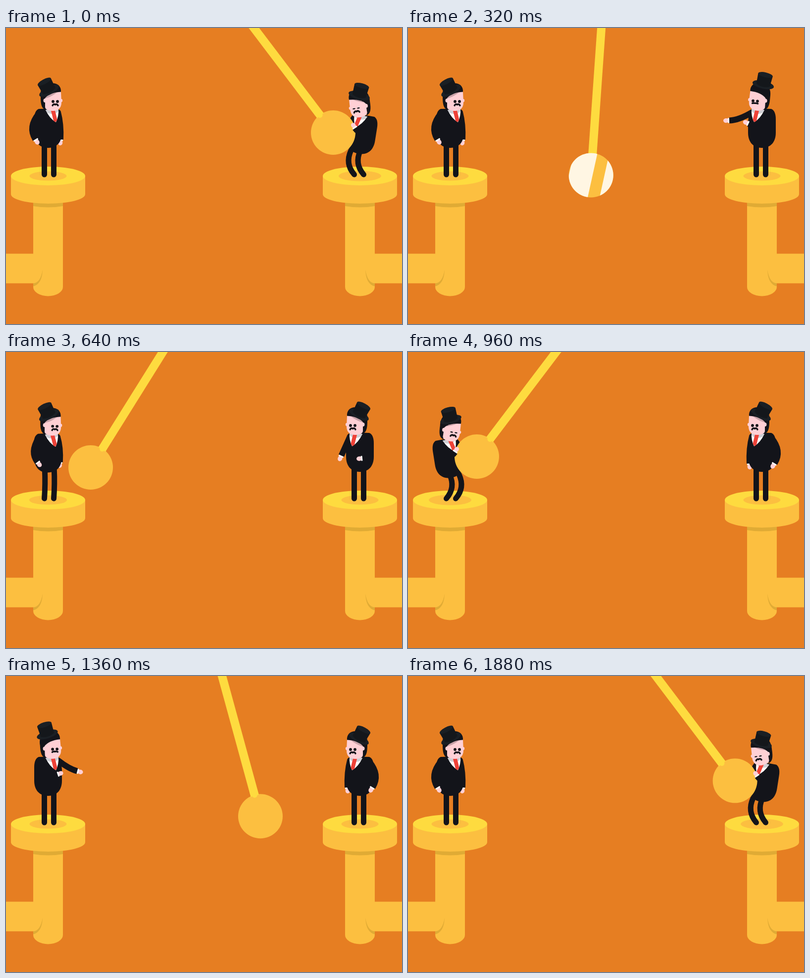
These frames come from a looping animation (800x600 px, 1920 ms). An HTML page with a canvas:

```html
<!DOCTYPE html>
<html lang="en">
<head>
<meta charset="utf-8">
<title>Pendulum push</title>
<style>
  html, body { margin: 0; width: 100%; height: 100%; overflow: hidden; background: #e67e22; }
  canvas { display: block; }
</style>
</head>
<body>
<canvas id="stage" width="800" height="600"></canvas>
<script>
const ctx = document.getElementById('stage').getContext('2d');
const LOOP = 1920, HALF = LOOP / 2, STEP = 40, RAD = Math.PI / 180;
const PIVOT = { x: 400, y: -133.6 }, LENGTH = 433.1, SWING = 37.06, BALL = 45;

const color = {
  back: '#e67e22', gold: '#fcbf40', bright: '#fedb3f', shade: '#e0ab35', glint: '#fff6e3',
  suit: '#13141a', hat: '#14171b', hatTop: '#1a1f24', skin: '#ffd0d5', tie: '#ee4238',
  shirt: '#fff', chin: '#cfcfd4'
};

// crouch, mouth curve | head x, y, turn | hat x, y, turn | near elbow, wrist | far elbow, wrist
const hit   = [1, 1,   -7, 14, 9,   86.5, 137, -15,  82, 222, 94.5, 203,    104, 190, 100, 200];
const push  = [0, 0,   -2, -1, -8,  80.5, 113, -10,  92, 203, 117, 190,     125, 183, 155, 184];
const hold  = [0, .1,  -1, -1, -4,  82.5, 115, -13,  86, 206, 112, 194,     132, 187, 151, 187.5];
const lower = [0, 1,   -.5, 0, 0,   86, 127, -28,    60, 212, 84, 213,      116, 192, 126, 206];
const drop  = [0, 1,   0, 0, 0,     87, 127, -28,    57, 213, 80, 215.5,    114.5, 192, 122.5, 210];
const idle  = [0, 1,   0, 0, 0,     87, 127, -28,    44, 200, 59.5, 225.5,  111.5, 195, 110, 226];

const linear = z => z;
const smooth = z => z * z * (3 - 2 * z);
const easeOut = z => 1 - (1 - z) * (1 - z);

// each key: time, pose, easing towards the next key
const keys = [
  [0, hit, smooth], [190, push, linear], [240, push, linear], [320, hold, linear],
  [600, lower, linear], [640, drop, easeOut], [900, idle, linear], [1580, idle, easeOut],
  [LOOP, hit, linear]
];

function poseAt(time) {
  let i = 0;
  while (time >= keys[i + 1][0]) i++;
  const [start, from, ease] = keys[i], [end, to] = keys[i + 1];
  const z = ease((time - start) / (end - start));
  return from.map((v, n) => v + (to[n] - v) * z);
}

// cubic-bezier(.333, 0, .16, 1)
function swingEase(u) {
  let lo = 0, hi = 1;
  for (let i = 0; i < 24; i++) {
    const s = (lo + hi) / 2, r = 1 - s;
    if (3 * r * r * s * .333 + 3 * r * s * s * .16 + s * s * s < u) lo = s; else hi = s;
  }
  return smooth(lo);
}

function fill(style, path) {
  ctx.fillStyle = style;
  ctx.fill(path);
}

function oval(style, x, y, rx, ry, turn = 0) {
  ctx.fillStyle = style;
  ctx.beginPath();
  ctx.ellipse(x, y, rx, ry, turn, 0, 7);
  ctx.fill();
}

function line(style, width, cap, ...p) {
  ctx.strokeStyle = style;
  ctx.lineWidth = width;
  ctx.lineCap = cap;
  ctx.beginPath();
  ctx.moveTo(p[0], p[1]);
  if (p.length > 4) ctx.quadraticCurveTo(p[2], p[3], p[4], p[5]);
  else ctx.lineTo(p[2], p[3]);
  ctx.stroke();
}

function scoped(draw) {
  ctx.save();
  draw();
  ctx.restore();
}

function mirrored(on, draw) {
  scoped(() => {
    if (on) { ctx.translate(800, 0); ctx.scale(-1, 1); }
    draw();
  });
}

const shape = {
  pipe: new Path2D('M55 345V525A30 18.5 0 0 0 115 525V345Z'),
  pipeShade: new Path2D('M55 340V361Q85 366 115 361V340Z'),
  elbow: new Path2D('M0 457.5H60V517.5H0Z'),
  elbowShade: new Path2D('M74 490C73 511 66 521 55 523.5V517.5C65 517 71 508 74 490Z'),
  disc: new Path2D('M10 300V337A75 19 0 0 0 160 337V300Z'),
  body: new Path2D('M66 164Q57 168 57 185V212C57 232 68 243 85 243C102 243 113 232 113 212V190Q112 172 104 163Z'),
  shirt: new Path2D('M80 166L106 164Q107 178 101 191Q88 184 80 166Z'),
  tie: new Path2D('M91 168L99 167L103.500 186L100 191L96 188Z'),
  hair: new Path2D('M80 166C72 163 70 155 70 140C68 120 78 112 92 112C104 111 112 118 111 130L90 150Z'),
  face: new Path2D('M79 142Q88 131 111 129.500L112 151C112 163 104 168 95 168C88 168 79 166 79 160Z'),
  crown: new Path2D('M-15 -20.500L-14 1Q0 8 14 1L15 -20.500Z')
};

function stand(crouch) {
  fill(color.gold, shape.pipe);
  fill(color.shade, shape.pipeShade);
  fill(color.gold, shape.elbow);
  fill(color.shade, shape.elbowShade);
  fill(color.gold, shape.disc);
  oval(color.bright, 85, 300, 75, 19);
  oval(color.gold, 85, 300, 37.5 + 5.5 * crouch, 9.4 + 1.2 * crouch);
}

function torsoSpace(k) {
  ctx.translate(85 + 2 * k, 243 + 12 * k);
  ctx.rotate(-9 * RAD * k);
  ctx.translate(-85, -243);
}

// Where a point of the upright torso lies when crouched
function onTorso(k, x, y) {
  const a = -9 * RAD * k, dx = x - 85, dy = y - 243;
  return [85 + 2 * k + dx * Math.cos(a) - dy * Math.sin(a),
          243 + 12 * k + dx * Math.sin(a) + dy * Math.cos(a)];
}

function arm(shoulder, cx, cy, wx, wy, width) {
  const a = Math.atan2(wy - cy, wx - cx), ux = Math.cos(a), uy = Math.sin(a);
  oval(color.skin, wx + 6.5 * ux, wy + 6.5 * uy, 5.5, 4.6, a);
  line(color.shirt, 10, 'butt', wx - ux, wy - uy, wx + 3 * ux, wy + 3 * uy);
  oval(color.suit, ...shoulder, width / 2, width / 2);
  line(color.suit, width, 'butt', ...shoulder, cx, cy, wx, wy);
}

function hatSpace(p) {
  ctx.translate(p[5], p[6]);
  ctx.rotate(p[7] * RAD);
}

function head(p) {
  const [k, curve, x, y, turn] = p;
  scoped(() => {
    ctx.translate(99.5 + x, 149 + y);
    ctx.rotate(turn * RAD);
    ctx.translate(-99.5, -149);
    fill(color.suit, shape.hair);
    oval(color.skin, 79, 147, 3.5, 4);
    oval(color.skin, 111.5, 147, 2.6, 3.2);
    fill(color.skin, shape.face);
    for (const ex of [95, 104]) oval(color.suit, ex, 149, 2.9, 2.9 - 1.7 * k);
    const mid = 153.2 + 2 * curve, end = 153.5 + 3.6 * curve;
    line(color.suit, 3.4, 'round', 94, end, 96, mid - 2 * curve, 99.5, mid);
    line(color.suit, 3.4, 'round', 99.5, mid, 103, mid - 2 * curve, 105, end);
    // hat shadow on the forehead
    ctx.clip(shape.face);
    ctx.translate(99.5, 149);
    ctx.rotate(-turn * RAD);
    ctx.translate(-99.5 - x, -149 - y);
    hatSpace(p);
    oval('rgba(90,70,75,.32)', 0, 4, 22, 8);
  });
  scoped(() => {
    hatSpace(p);
    oval(color.hatTop, 0, 0, 22, 8);
    fill(color.hat, shape.crown);
    oval(color.hatTop, 0, -20.5, 15, 5);
  });
}

function man(p) {
  const k = p[0];
  for (const x of [77.5, 96.5]) {
    line(color.suit, 11, 'round', x + 6.5 * k, 235 + 13 * k, x + 19 * k, 266 + 9 * k, x, 297);
  }
  arm(onTorso(k, 105, 171), ...p.slice(12, 16), 12);
  scoped(() => {
    torsoSpace(k);
    fill(color.suit, shape.body);
    fill(color.shirt, shape.shirt);
    scoped(() => {
      ctx.clip(shape.shirt);
      oval(color.chin, 93, 163, 15, 11);
    });
    fill(color.tie, shape.tie);
  });
  head(p);
}

function nearArm(p) {
  arm(onTorso(p[0], 67, 173), ...p.slice(8, 12), 12.5);
}

function pendulum(time) {
  const side = time < HALF ? 1 : -1;
  const a = side * SWING * RAD * (1 - 2 * swingEase((time % HALF) / HALF));
  const at = r => [PIVOT.x + r * Math.sin(a), PIVOT.y + r * Math.cos(a)];
  const [x, y] = at(LENGTH);
  oval(color.gold, x, y, BALL, BALL);
  line(color.bright, 17, 'butt', ...PIVOT_TOP, ...at(LENGTH - 43));
  line(color.bright, 11, 'round', ...at(LENGTH - 60), ...at(LENGTH - 44.5));
  // a reflection fixed in space, seen only on the ball
  scoped(() => {
    ctx.beginPath();
    ctx.arc(x, y, BALL, 0, 7);
    ctx.clip();
    ctx.transform(1, 0, -.22, 1, .22 * 298, 0);
    ctx.fillStyle = color.glint;
    ctx.fillRect(325, 150, 48, 250);
    ctx.fillRect(397, 150, 24, 250);
  });
}
const PIVOT_TOP = [PIVOT.x, PIVOT.y];

function draw(time) {
  const poses = [poseAt((time + HALF) % LOOP), poseAt(time)];
  const both = part => poses.forEach((p, i) => mirrored(i === 1, () => part(p)));
  ctx.fillStyle = color.back;
  ctx.fillRect(0, 0, 800, 600);
  both(p => stand(p[0]));
  both(man);
  pendulum(time);
  both(nearArm);
}

function tick() {
  draw(Math.floor((performance.now() % LOOP) / STEP) * STEP);
  requestAnimationFrame(tick);
}
tick();
</script>
</body>
</html>
```
